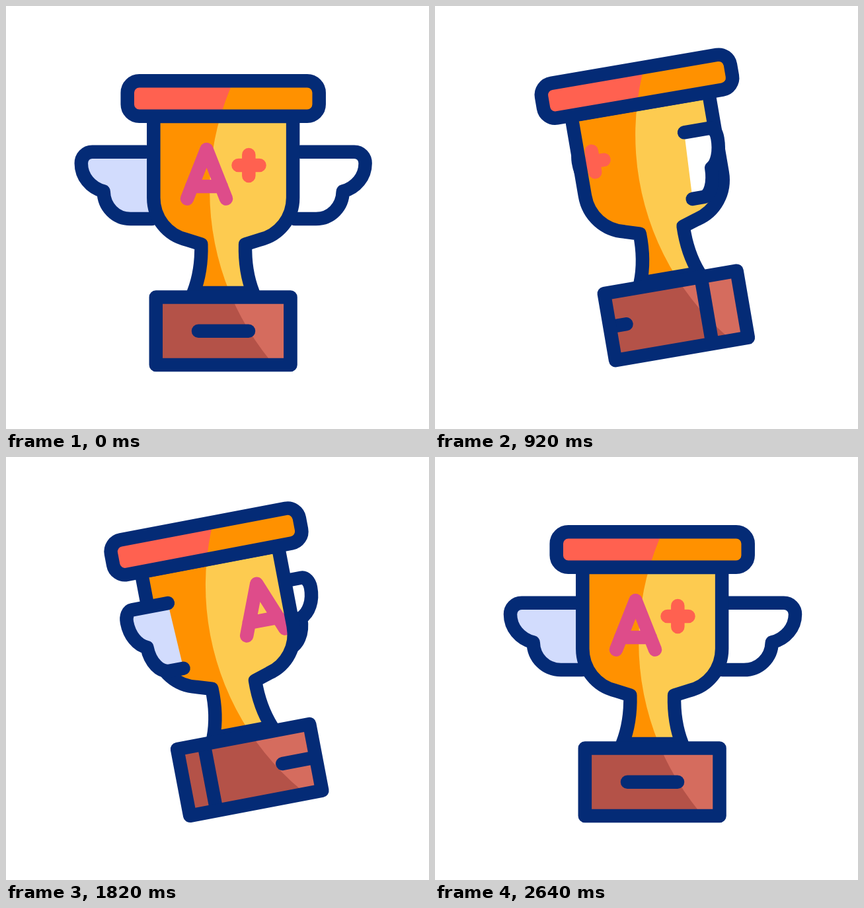
These frames come from a looping animation (640 by 640 pixels, 2.82 s). An HTML page with a canvas:

```html
<!DOCTYPE html>
<html lang="en">
<head>
<meta charset="utf-8">
<title>Spinning trophy</title>
<style>
html, body { margin: 0; width: 100%; height: 100%; overflow: hidden; background: #fff; }
canvas { display: block; width: 100vw; height: 100vh; }
</style>
</head>
<body>
<canvas id="stage" width="640" height="640"></canvas>
<script>
const ctx = document.getElementById('stage').getContext('2d');
const LOOP = 2820, STEP = 20;
const PIVOT = { x: 328.7, y: 277.5 };
const LINE = 20.5;
const NAVY = '#042b76', RED = '#ff6150', ORANGE = '#ff9100', YELLOW = '#fdcb50',
      PINK = '#de4c8a', LILAC = '#d2dcfd', BROWN = '#b45248', ROSE = '#d56c5e', WHITE = '#fff';

const mirror = x => 2 * PIVOT.x - x;
const mix = (a, b, k) => a + (b - a) * k;

function ease(t, from, to) {
  const u = Math.min(1, Math.max(0, (t - from) / (to - from)));
  return u * u * (3 - 2 * u);
}

// Eased value through [time, value] keys, at rest on every key.
function eased(t, keys) {
  let value = keys[0][1];
  for (let i = 1; i < keys.length; i++)
    value += (keys[i][1] - keys[i - 1][1]) * ease(t, keys[i - 1][0], keys[i][0]);
  return value;
}

// Smooth curve through [time, value] keys, passing them without stopping.
function smooth(t, keys) {
  const last = keys.length - 1;
  if (t <= keys[0][0]) return keys[0][1];
  if (t >= keys[last][0]) return keys[last][1];
  const i = keys.findIndex(k => k[0] > t) - 1;
  const slope = n => n === 0 || n === last ? 0 :
    (keys[n + 1][1] - keys[n - 1][1]) / (keys[n + 1][0] - keys[n - 1][0]);
  const [t0, v0] = keys[i], [t1, v1] = keys[i + 1];
  const d = t1 - t0, u = (t - t0) / d;
  return v0 + (v1 - v0) * u * u * (3 - 2 * u) +
    d * u * (1 - u) * (slope(i) * (1 - u) - slope(i + 1) * u);
}

const HOP = [[200, 0], [800, -25.6], [1400, 25.6], [2000, -25.6], [2600, 0]];
const TILT = [[200, 0], [1400, -15], [2600, 0]];
const EDGE = [[200, 430.5], [600, 409.4], [920, 375.5], [1340, 326.8],
              [1820, 267.9], [2140, 237.5], [2420, 226.8]];

function makeCup() {
  const p = new Path2D(), m = mirror;
  p.moveTo(223.3, 167);
  p.lineTo(223.3, 290);
  p.bezierCurveTo(223.3, 321, 244, 346.5, 273, 353.5);
  p.lineTo(295.3, 360.5);
  p.bezierCurveTo(296, 386, 293, 410, 283.5, 434);
  p.lineTo(m(283.5), 434);
  p.bezierCurveTo(m(293), 410, m(296), 386, m(295.3), 360.5);
  p.lineTo(m(273), 353.5);
  p.bezierCurveTo(m(244), 346.5, m(223.3), 321, m(223.3), 290);
  p.lineTo(m(223.3), 167);
  p.closePath();
  return p;
}

const cup = makeCup();
const rim = new Path2D();
rim.roundRect(183.7, 113.3, 290, 53.4, 18);
const base = new Path2D();
base.rect(226.8, 440.5, 203.7, 102.5);
const shine = new Path2D();
shine.arc(712.6, 280.2, 404.4, 0, 2 * Math.PI);
const letter = new Path2D('M274 291.5L303.5 217L333 291.5M281 273H326');
const plus = new Path2D('M351.5 241H383.5M367.3 225V257');
const slot = new Path2D('M291 491.7H367');

function outline(path, color = NAVY) {
  ctx.strokeStyle = color;
  ctx.stroke(path);
}

// Two-tone fill split by the shine, with optional details cut to the shape.
function body(path, dark, light, details) {
  ctx.save();
  ctx.clip(path);
  ctx.fillStyle = dark;
  ctx.fill(path);
  ctx.fillStyle = light;
  ctx.fill(shine);
  if (details) details();
  ctx.restore();
  outline(path);
}

function wing(top, bottom, tip, color) {
  const x = k => mix(top, tip, k);
  const p = new Path2D();
  p.moveTo(top, 220.7);
  p.lineTo(x(.83), 220.7);
  p.bezierCurveTo(x(.93), 220.7, tip, 228.5, tip, 238);
  p.bezierCurveTo(tip, 258, x(.86), 275, x(.655), 280.5);
  p.bezierCurveTo(x(.65), 304, x(.47), 322, x(.24), 322);
  p.lineTo(bottom, 322);
  ctx.fillStyle = color;
  ctx.fill(p);
  outline(p);
}

function draw(t) {
  ctx.setTransform(1, 0, 0, 1, 0, 0);
  ctx.fillStyle = WHITE;
  ctx.fillRect(0, 0, 640, 640);
  ctx.translate(PIVOT.x, PIVOT.y + eased(t, HOP));
  ctx.rotate(eased(t, TILT) * Math.PI / 180);
  ctx.translate(-PIVOT.x, -PIVOT.y);
  ctx.lineWidth = LINE;
  ctx.lineCap = ctx.lineJoin = 'round';

  const turn = ease(t, 200, 2400);
  const top = mix(445.5, 214.5, turn);
  const bottom = mix(437, 222, turn);
  const tip = mix(543.6, 114, turn);
  const flipped = tip < top;
  const nearWing = () => wing(top, bottom, tip, flipped ? LILAC : WHITE);
  const spinning = t > 200 && t < 2640;

  const slide = out => t < 1300
    ? -out * ease(t, 200, 1300)
    : 163 * (1 - ease(t, 1300, 2400));

  wing(mirror(top), mirror(bottom), mirror(tip) + 1.6 * turn, flipped ? WHITE : LILAC);
  if (!spinning) nearWing();

  body(cup, ORANGE, YELLOW, () => {
    ctx.translate(slide(169.5), 0);
    outline(letter, PINK);
    outline(plus, RED);
  });

  body(base, BROWN, ROSE, () => {
    const edge = new Path2D();
    const x = smooth(t, EDGE);
    edge.moveTo(x, 440.5);
    edge.lineTo(x, 543);
    outline(edge);
    ctx.translate(slide(158.5), 0);
    outline(slot);
  });

  body(rim, RED, ORANGE);
  if (spinning) nearWing();
}

const start = performance.now();
function frame() {
  const t = (performance.now() - start) % LOOP;
  draw(Math.floor(t / STEP) * STEP);
  requestAnimationFrame(frame);
}
frame();
</script>
</body>
</html>
```
